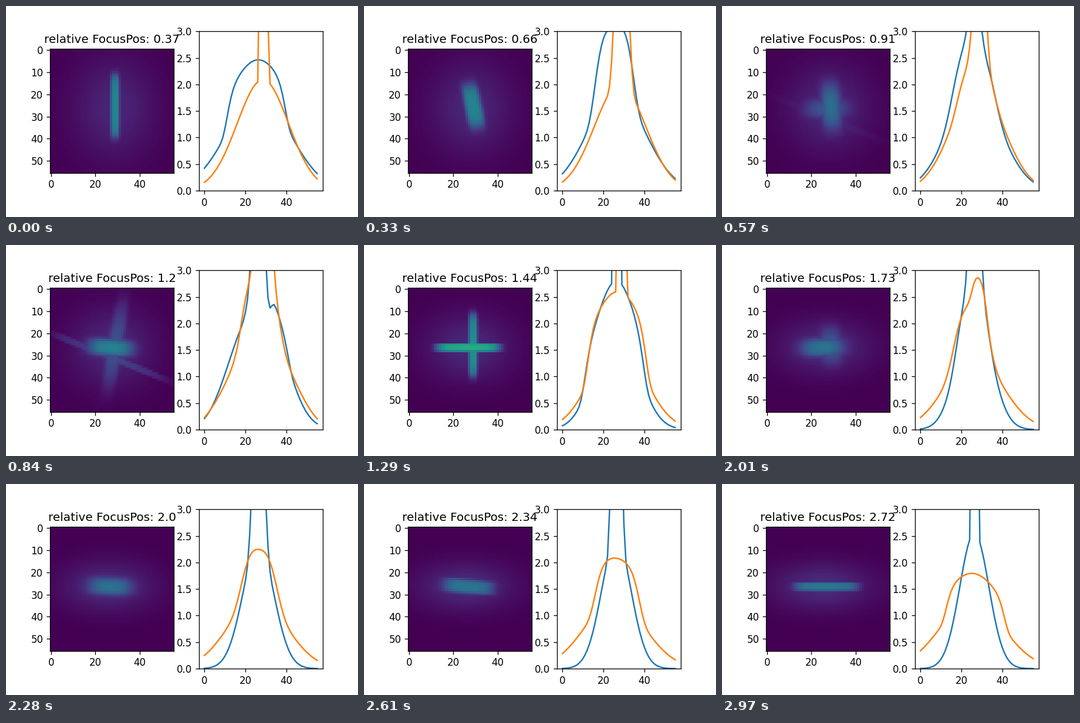
Write a matplotlib script that moves like this. It is 600 by 360 pixels and loops after 3 s.

```python
import numpy as np
import matplotlib.pyplot as plt
from matplotlib.animation import FuncAnimation

FRAMES, INTERVAL, SIZE = 100, 30, 56
CROSS = 43        # both bars are sharp here; one bar is sharp at each end
GAIN = .55        # image sum to curve height

KEYS = [0, 11, 28, CROSS, 58, 76, 99]
FOCUS = [.37, .66, 1.2, 1.44, 1.47, 2.0, 2.72]
UPRIGHT = [.34, .34, .14, .38, .29, 0, 0]
FLAT = [0, 0, .33, .5, .27, .25, .27]

axis = np.arange(SIZE)
gx, gy = np.meshgrid(axis, axis)


def bump(n, centre, width):
    return np.exp(-((n - centre) / width) ** 2)


def blob(cx, cy, rx, ry, deg=0, power=2):
    """Soft shape: a Gaussian at power 2, nearly a box at high powers."""
    a = np.radians(deg)
    dx, dy = gx - cx, gy - cy
    u = np.abs(dx * np.cos(a) + dy * np.sin(a)) / rx
    v = np.abs(dy * np.cos(a) - dx * np.sin(a)) / ry
    return np.exp(-u ** power - v ** power)


def picture(n):
    t = n / (FRAMES - 1)
    if n < CROSS:
        phase = np.pi * n / CROSS
    else:
        phase = np.pi * (n - CROSS) / (FRAMES - 1 - CROSS)
    blur, tilt = np.sin(phase), np.sin(2 * phase)
    power = 8 - 5 * blur
    flare = bump(n, 28, 7)

    upright = blob(28.9, 25.3, 2 + 2.4 * blur - flare,
                   14.5 - 6 * blur + 11 * flare, -12 * tilt, power)
    flat = blob(26.8 - 7 * bump(n, 58, 8), 26.4, 14.5 - 5 * blur,
                1.8 + 2.1 * blur, -5 * tilt, power)
    streak = blob(26.5, 30.7, 28, 1.5, 22, 6)
    bright = np.maximum.reduce([np.interp(n, KEYS, UPRIGHT) * upright,
                                np.interp(n, KEYS, FLAT) * flat,
                                .1 * flare * streak])

    # The glow starts tall and ends wide.
    glow = blob(28.5 - 3.5 * t, 26.3, 17.7 + 4 * t ** 2,
                22 - 12 * np.sin(np.pi / 2 * t))
    return bright + (.105 + .025 * t) * glow


fig, (left, right) = plt.subplots(1, 2, figsize=(5, 3), dpi=120)
fig.subplots_adjust(left=.125, right=.9, bottom=.125, top=.88, wspace=.2)

image = left.imshow(picture(0), cmap="viridis", vmin=0, vmax=1,
                    interpolation="nearest")
left.set_xticks([0, 20, 40])
left.set_yticks(range(0, 60, 10))
title = left.set_title("")

row_line, = right.plot(axis, axis)
col_line, = right.plot(axis, axis)
right.set_xlim(-2.75, 57.75)
right.set_ylim(0, 3)
right.set_xticks([0, 20, 40])
right.set_yticks(np.arange(0, 3.1, .5))


def update(n):
    img = picture(n)
    image.set_data(img)
    row_line.set_ydata(GAIN * img.sum(axis=1))
    col_line.set_ydata(GAIN * img.sum(axis=0))
    title.set_text(f"relative FocusPos: {round(float(np.interp(n, KEYS, FOCUS)), 2)}")
    return image, row_line, col_line, title


anim = FuncAnimation(fig, update, frames=FRAMES, interval=INTERVAL,
                     repeat=True, repeat_delay=0, blit=False)
plt.show()
```
